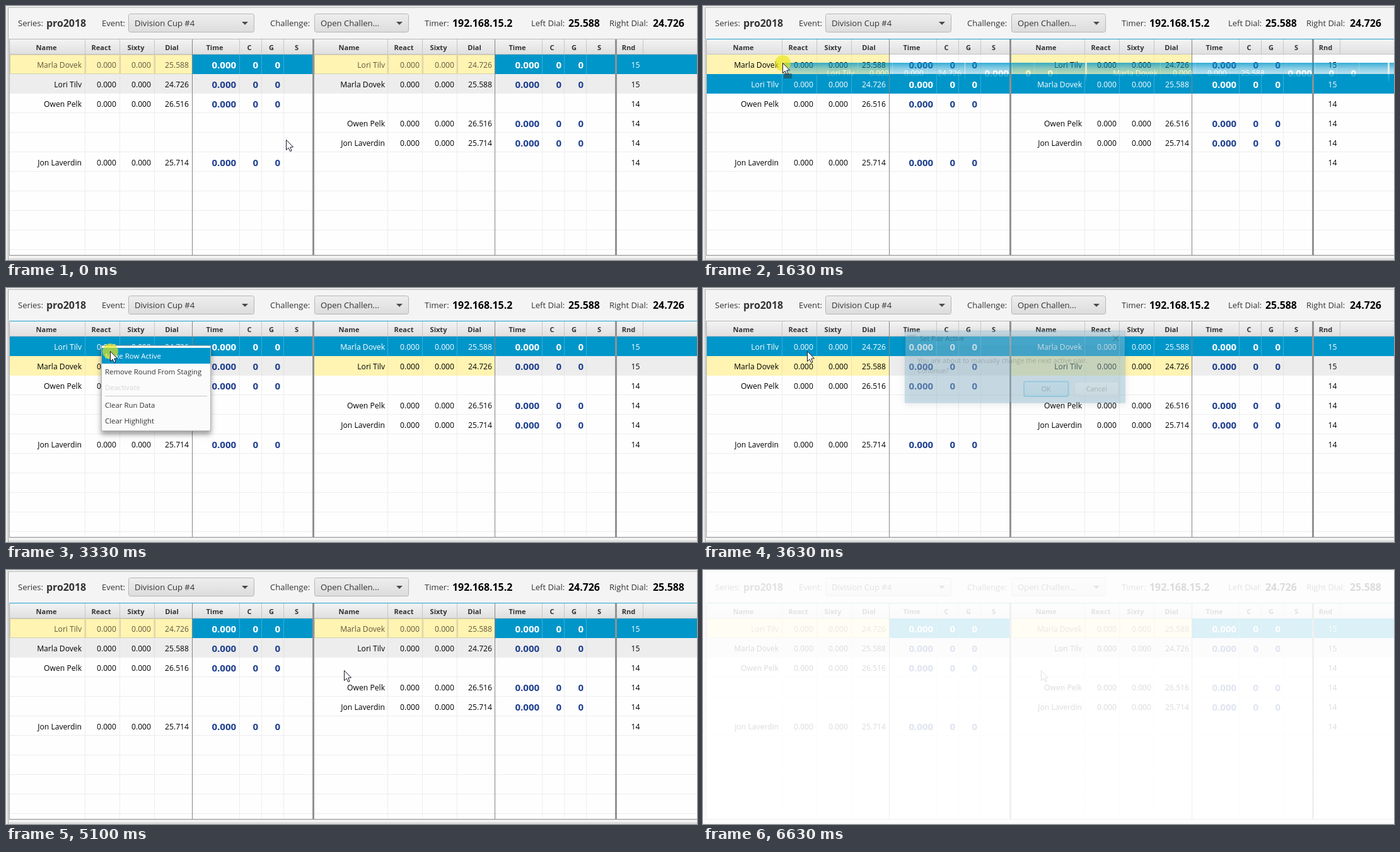
An HTML page with a canvas for the animation above (6.7 s loop, 1096x403 px).

```html
<!DOCTYPE html>
<html lang="en">
<head>
<meta charset="utf-8">
<title>Staging table</title>
<style>
html, body { margin: 0; width: 100%; height: 100%; overflow: hidden; background: #fff; }
canvas { display: block; }
</style>
</head>
<body>
<canvas id="stage" width="1096" height="403"></canvas>
<script>
const W = 1096, H = 403, LOOP = 6700;
const TOP = 77, ROW = 31, PANEL = 480;
const BLUE = '#0096c9', YELLOW = '#fff4b2', FOCUS = '#1f9fd0';
const stage = document.getElementById('stage').getContext('2d');
let ctx = stage;

const racers = {
  marla: ['Marla Dovek', '25.588'],
  lori: ['Lori Tilv', '24.726'],
  owen: ['Owen Pelk', '26.516'],
  jon: ['Jon Laverdin', '25.714']
};
const rounds = [
  ['marla', 'lori', 15], ['lori', 'marla', 15], ['owen', null, 14],
  [null, 'owen', 14], [null, 'jon', 14], ['jon', null, 14]
];
const headers = [['Name', 64], ['React', 151], ['Sixty', 206], ['Dial', 263],
  ['Time', 331], ['C', 386], ['G', 421], ['S', 461]];
const dividers = [125, 180, 235, 370, 405, 440];
const menuItems = [['Make Row Active', 112], ['Remove Round From Staging', 137],
  ['Deactivate', 162], ['Clear Run Data', 190], ['Clear Highlight', 215]];

function rect(x, y, w, h, color) {
  ctx.fillStyle = color;
  ctx.fillRect(x, y, w, h);
}

function text(str, x, y, size, color = '#000', align = 'left', weight = 400) {
  ctx.font = `${weight} ${size}px "Open Sans", "Noto Sans", sans-serif`;
  ctx.fillStyle = color;
  ctx.textAlign = align;
  ctx.fillText(str, x, y);
}

function shade(y, h, from, to) {
  const g = ctx.createLinearGradient(0, y, 0, y + h);
  g.addColorStop(0, from);
  g.addColorStop(1, to);
  return g;
}

function box(x, y, w, h, fill, border, line = 1) {
  ctx.beginPath();
  ctx.roundRect(x + line / 2, y + line / 2, w - line, h - line, 3);
  ctx.fillStyle = fill;
  ctx.fill();
  ctx.strokeStyle = border;
  ctx.lineWidth = line;
  ctx.stroke();
}

function polygon(points) {
  ctx.beginPath();
  points.forEach(([x, y]) => ctx.lineTo(x, y));
  ctx.closePath();
}

function withShadow(blur, dy, alpha, draw) {
  ctx.save();
  ctx.shadowColor = `rgba(0,0,0,${alpha})`;
  ctx.shadowBlur = blur;
  ctx.shadowOffsetY = dy;
  draw();
  ctx.restore();
}

// Fraction of n equally spaced steps that have happened by time t.
function steps(t, start, end, n) {
  if (t < start) return 0;
  const gap = (end - start) / Math.max(1, n - 1);
  return Math.min(n, Math.floor((t - start) / gap + 1e-6) + 1) / n;
}

const moves = [
  [80, 540, 7, 130, 126], [710, 710, 1, 128, 126], [1090, 1615, 8, 126, 90],
  [2170, 2320, 3, 151, 91], [2930, 3100, 3, 165, 100],
  [3940, 4100, 3, 514, 148], [4250, 4400, 3, 536, 159]
];

function pointerAt(t) {
  let x = 444, y = 212;
  for (const [start, end, n, toX, toY] of moves) {
    const p = end > start ? steps(t, start, end, n) : +(t >= start);
    const e = p * p * (3 - 2 * p);
    x += (toX - x) * e;
    y += (toY - y) * e;
  }
  return { x: Math.round(x), y: Math.round(y) };
}

function combo(x, w, label) {
  box(x, 12, w, 30, shade(12, 30, '#eeeeee', '#dcdcdc'), '#b6b6b6');
  text(label, x + 10, 32, 13.1, '#333');
  polygon([[x + w - 20, 25], [x + w - 10, 25], [x + w - 15, 30]]);
  ctx.fillStyle = '#4a4a4a';
  ctx.fill();
}

function toolbar(leftDial, rightDial) {
  rect(0, 0, W, H, '#f4f4f4');
  rect(0, 0, W, 2, '#ececec');
  rect(3, 2, W, 1, '#bcbcbc');
  rect(0, 0, 3, H, '#ececec');
  rect(3, 2, 1, H, '#a8a8a8');
  const fields = [['Series:', 19, 'pro2018', 64], ['Event:', 152], ['Challenge:', 419],
    ['Timer:', 664, '192.168.15.2', 708], ['Left Dial:', 833, leftDial, 892],
    ['Right Dial:', 957, rightDial, 1026]];
  for (const [label, x, value, valueX] of fields) {
    text(label, x, 32, 13, '#333');
    if (value) text(value, valueX, 33, 15.9, label === 'Series:' ? '#333' : '#000', 'left', 700);
  }
  combo(194, 200, 'Division Cup #4');
  combo(489, 150, 'Open Challen...');
}

function racerCells(key, x, y, selected, active) {
  if (!key) return;
  const [name, dial] = racers[key];
  const color = selected ? (active ? '#62583f' : '#fff') : '#000';
  [[name, 120], ['0.000', 175], ['0.000', 230], [dial, 290]]
    .forEach(([s, right]) => text(s, x + right, y + 21, 12.15, color, 'right'));
  [['0.000', 365], ['0', 400], ['0', 435]]
    .forEach(([s, right]) => text(s, x + right, y + 22, 15, selected ? '#fff' : '#1f3f8f', 'right', 700));
}

function tableRow(round, y, { selected, active, striped }) {
  rect(6, y, W, ROW, selected ? BLUE : striped ? '#ededed' : '#fefefe');
  if (!selected && !striped) rect(6, y + ROW - 1, W, 1, '#ededed');
  for (const x of [0, PANEL]) {
    const left = x ? 489 : 6;
    if (active) rect(left, y, x + 295 - left, ROW, YELLOW);
    for (const d of dividers) {
      const tint = selected ? 'rgba(255,255,255,.22)' : striped ? '#e2e2e2' : '#ededed';
      rect(x + d, y, 1, ROW, active && d < 295 ? '#f0e6ab' : tint);
    }
    if (active && selected) {
      const edges = [left, x + 126, x + 181, x + 236, x + 296];
      ctx.strokeStyle = '#d8d1ad';
      ctx.lineWidth = 1;
      for (let i = 0; i < 4; i++)
        ctx.strokeRect(edges[i] + .5, y + .5, edges[i + 1] - edges[i] - 1.5, ROW - 1);
    }
  }
  if (!round) return;
  racerCells(round[0], 0, y, selected, active);
  racerCells(round[1], PANEL + 1, y, selected, active);
  text(round[2], 998.5, y + 21, 12.15, selected ? '#fff' : '#000', 'center');
}

function panelLines(y, h) {
  for (const x of [295, 775]) rect(x, y, 1, h, '#858585');
  for (const x of [486, 966]) rect(x, y, 3, h, '#929292');
}

function table(rows, selected, active, focused) {
  rect(5, 52, W, 344, '#fefefe');
  ctx.save();
  ctx.beginPath();
  ctx.rect(5, 53, W, 342);
  ctx.clip();
  for (let i = 0; i < 11; i++)
    tableRow(rows[i], TOP + i * ROW, { selected: i === selected, active: i === active, striped: i === 1 });
  ctx.restore();

  rect(6, 53, W, 24, shade(53, 24, '#f3f3f3', '#dfdfdf'));
  rect(6, 76, W, 1, '#c4c4c4');
  for (const x of [0, PANEL]) {
    for (const d of dividers) rect(x + d, 53, 1, 24, '#c6c6c6');
    for (const [label, mid] of headers) text(label, x + mid, 70, 11, '#333', 'center', 700);
  }
  rect(1010, 53, 1, 24, '#c6c6c6');
  text('Rnd', 987.5, 70, 11, '#333', 'center', 700);
  panelLines(53, 342);

  rect(5, 52, W, 1, focused ? FOCUS : '#b5b5b5');
  rect(5, 52, 1, 344, '#a5a5a5');
  rect(5, 395, W, 1, '#8c8c8c');
  rect(4, 396, W, 7, '#f0f0f0');
  rect(4, 401, W, 1, '#c4c4c4');
}

// Translucent picture of the dragged row, fading out downwards.
const ghost = document.createElement('canvas');
ghost.width = W - 6;
ghost.height = ROW;

function paintGhost() {
  ctx = ghost.getContext('2d');
  ctx.save();
  ctx.translate(-6, 0);
  tableRow(rounds[1], 0, { selected: true });
  for (const x of [295, 486, 966]) rect(x, 0, x === 295 ? 1 : 3, ROW, '#c8d8dc');
  ctx.restore();
  const mask = ctx.createLinearGradient(0, 0, 0, ROW);
  [[0, .78], [.3, .45], [.6, .24], [1, .05]]
    .forEach(([at, a]) => mask.addColorStop(at, `rgba(0,0,0,${a})`));
  ctx.globalCompositeOperation = 'destination-in';
  ctx.fillStyle = mask;
  ctx.fillRect(0, 0, ghost.width, ROW);
  ctx = stage;
}

function contextMenu(hover) {
  withShadow(8, 5, .4, () => rect(151, 91, 174, 136, '#b4b4b4'));
  rect(152, 92, 172, 134, '#fbfbfb');
  if (hover) rect(152, 95, 172, 25, BLUE);
  rect(157, 171, 162, 1, '#c8c8c8');
  menuItems.forEach(([label, y], i) =>
    text(label, 157, y, 11.4, i === 2 ? '#d6d6d6' : i === 0 && hover ? '#fff' : '#333'));
}

function dialog(alpha, hover, pressed) {
  ctx.save();
  ctx.globalAlpha = alpha;
  const scale = .92 + .08 * alpha;
  ctx.translate(495, 125);
  ctx.scale(scale, scale);
  ctx.translate(-495, -125);
  withShadow(10, 3, .35, () => rect(309, 64, 372, 122, '#1d83b4'));
  rect(310, 65, 370, 24, '#fff');
  rect(310, 89, 370, 96, '#f4f4f4');
  rect(313, 71, 15, 12, '#5f8fae');
  text('Set Pair Active', 334, 81, 11.4);
  ctx.strokeStyle = '#111';
  ctx.lineWidth = 1.2;
  ctx.beginPath();
  ctx.moveTo(660, 72); ctx.lineTo(670, 82);
  ctx.moveTo(670, 72); ctx.lineTo(660, 82);
  ctx.stroke();
  text('You are about to manually change the next active pair.', 330, 119, 11.36, '#333');
  text('Continue?', 330, 136, 11.36, '#333');
  const fill = pressed ? ['#8fc3dc', '#76b3d0'] : hover ? ['#c4e3f1', '#9ccee5'] : ['#b5d9ea', '#8cc3de'];
  box(509, 149, 77, 27, shade(149, 27, ...fill), '#15a0d2', 2);
  box(595, 150, 75, 25, shade(150, 25, '#f0f0f0', '#dcdcdc'), '#b6b6b6');
  text('OK', 547, 167, 11.4, '#333', 'center');
  text('Cancel', 632.5, 167, 11.4, '#333', 'center');
  ctx.restore();
}

function pointer({ x, y }, clicking, dragging) {
  if (clicking) {
    ctx.beginPath();
    ctx.arc(x + .5, y + .5, 12.5, 0, 2 * Math.PI);
    ctx.fillStyle = 'rgba(232,230,20,.66)';
    ctx.fill();
  }
  if (dragging)
    for (let i = 0; i < 13; i++)
      for (let j = 0; j < 8; j++)
        if ((i + j) % 2) rect(x + 2 + i, y + 17 + j, 1, 1, '#333');
  ctx.save();
  ctx.translate(x + .5, y + .5);
  polygon([[0, 0], [0, 16], [3.6, 12.6], [6.2, 18], [8.6, 17], [6.2, 11.6], [11, 11.3]]);
  ctx.fillStyle = '#fff';
  ctx.fill();
  ctx.strokeStyle = '#15152a';
  ctx.lineWidth = 1;
  ctx.stroke();
  ctx.restore();
}

function render(t) {
  const within = (a, b) => t >= a && t < b;
  const swapped = t >= 1690, confirmed = t >= 4950;
  const rows = swapped ? [rounds[1], rounds[0], ...rounds.slice(2)] : rounds;
  const selected = within(940, 1690) ? 1 : 0;
  const active = swapped && !confirmed ? 1 : 0;
  const at = pointerAt(t);
  const dragging = within(1090, 1690) && at.y < 118;
  const dials = ['25.588', '24.726'];
  if (confirmed) dials.reverse();

  toolbar(...dials);
  table(rows, selected, active, t >= 940 && !within(3480, 4950));
  if (dragging) ctx.drawImage(ghost, at.x, at.y);
  if (within(2630, 3480)) contextMenu(at.y >= 95);
  if (within(3480, 5100)) {
    const shown = (steps(t, 3480, 3790, 5) * 5 - 1) / 4;
    const alpha = Math.min(shown, 1 - steps(t, 4950, 5100, 3));
    if (alpha > 0) dialog(alpha, t >= 4250, within(4800, 4950));
  }
  const clicking = within(940, 1690) || within(2470, 2630) || within(3330, 3480) || within(4800, 4950);
  pointer(at, clicking, dragging);

  const fade = steps(t, 6280, 6630, 6) * 6 / 7;
  if (fade) rect(0, 0, W, H, `rgba(255,255,255,${fade})`);
}

paintGhost();
const begin = performance.now();
function tick() {
  render((performance.now() - begin) % LOOP);
  requestAnimationFrame(tick);
}
tick();
</script>
</body>
</html>
```
